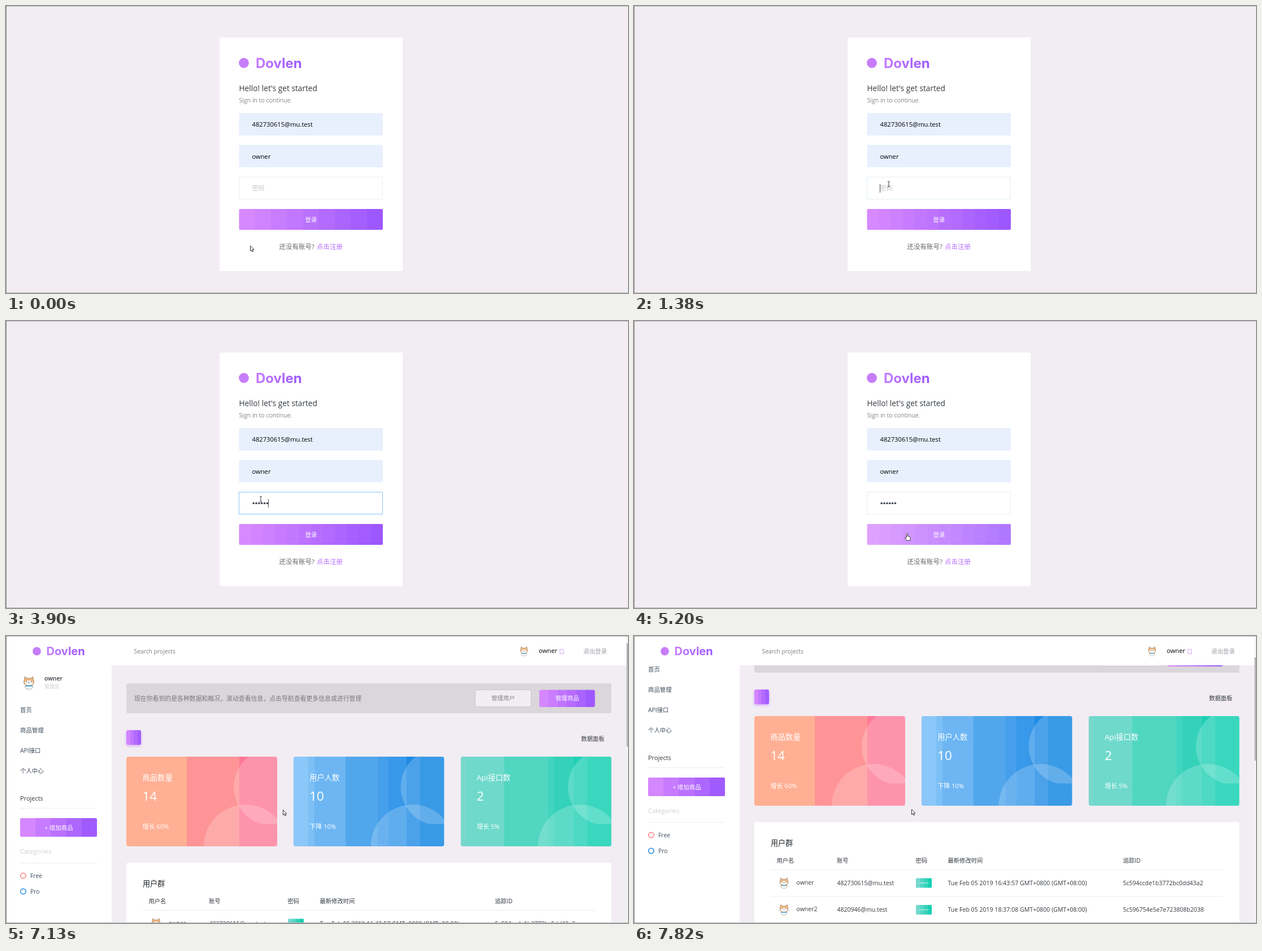
Write an HTML page with a canvas that moves like this. It is 1101 by 509 pixels and loops after 8 s.

```html
<!DOCTYPE html>
<html lang="zh-CN">
<head>
<meta charset="utf-8">
<title>Login and dashboard</title>
<style>
html, body { margin: 0; width: 100%; height: 100%; overflow: hidden; background: #f2edf3; }
canvas { display: block; }
</style>
</head>
<body>
<canvas id="stage" width="1101" height="509"></canvas>
<script>
const ctx = document.getElementById('stage').getContext('2d');
const LOOP = 8000;
const SANS = '"Open Sans", "Noto Sans CJK SC", "Noto Sans CJK JP", sans-serif';
const BRAND = 'Dovlen', USER = 'owner', MAIL = '482730615@mu.test';
const VIOLET = ['#da8cff', '#9a55ff'], TEAL = ['#84d9d2', '#07cdae'];

// Timelines: each entry holds from its time until the next one.
const CURSOR = [
  [0, 'arrow', 432, 425], [410, 'arrow', 432, 414], [570, 'hand', 436, 384],
  [700, 'hand', 443, 362], [830, 'beam', 452, 321], [980, 'beam', 451, 316],
  [4030, 'beam', 460, 326], [4180, 'arrow', 467, 346], [4310, 'hand', 473, 361],
  [4460, 'hand', 479, 376], [6550, 'arrow', 481, 375], [6700, 'arrow', 482, 361],
  [6850, 'arrow', 487, 332], [6970, 'arrow', 490, 310], [7130, 'arrow', 490, 308],
  [7290, 'arrow', 491, 307]
];
const DOTS = [[0, 0], [1960, 1], [2270, 2], [2680, 3], [3110, 4], [3500, 5], [3900, 6]];
const CARET = [[0, 0], [1380, 1], [1820, 0], [1960, 1], [4310, 0]];
const BORDER = [[0, '#ebedf2'], [1380, '#e2eef6'], [1500, '#8cc4fa'], [4920, '#d5e7f7'], [5050, '#ebedf2']];
const BUTTON_ALPHA = [[0, 1], [570, .92], [700, .96], [830, 1], [4460, .96], [4920, .9], [5050, .8]];
const SCROLL = [[0, 0], [7690, 11.5], [7820, 72]];

const at = (list, t) => list.filter(entry => entry[0] <= t).pop();
const valueAt = (list, t) => at(list, t)[1];

function box(x, y, w, h, fill, radius = 0) {
  ctx.fillStyle = fill;
  ctx.beginPath();
  ctx.roundRect(x, y, w, h, radius);
  ctx.fill();
}

function disc(x, y, r, fill) {
  ctx.fillStyle = fill;
  ctx.beginPath();
  ctx.arc(x, y, r, 0, 7);
  ctx.fill();
}

// y is the middle of the capitals.
function text(str, x, y, size, fill, { align = 'left', weight = 400, family = SANS } = {}) {
  ctx.font = `${weight} ${size}px ${family}`;
  ctx.textAlign = align;
  ctx.fillStyle = fill;
  ctx.fillText(str, x, y + size * .37);
}

function mix(from, to, k) {
  const channel = (c, i) => parseInt(c.slice(1 + 2 * i, 3 + 2 * i), 16);
  return `rgb(${[0, 1, 2].map(i => Math.round(channel(from, i) * (1 - k) + channel(to, i) * k))})`;
}

// Horizontal gradient of flat bands; stops are [start, colour].
function banded(x, w, stops) {
  const g = ctx.createLinearGradient(x, 0, x + w, 0);
  stops.forEach(([start, colour], i) => {
    g.addColorStop(start, colour);
    g.addColorStop(i + 1 < stops.length ? stops[i + 1][0] : 1, colour);
  });
  return g;
}

const evenBands = (x, w, [from, to], n) =>
  banded(x, w, Array.from({ length: n }, (_, i) => [i / n, mix(from, to, (i + .5) / n)]));

function brand(iconX, textX, y, size) {
  disc(iconX, y, size * .37, '#c77dfa');
  const g = ctx.createLinearGradient(textX, 0, textX + size * 3.4, 0);
  g.addColorStop(0, '#c67cff');
  g.addColorStop(1, '#9a55ff');
  text(BRAND, textX, y, size, g, { weight: 700, family: 'Inter, sans-serif' });
}

// Simple dog portrait, 20 units wide.
function dog(x, y, scale) {
  ctx.save();
  ctx.translate(x, y);
  ctx.scale(scale, scale);
  ctx.strokeStyle = '#8d7260';
  ctx.lineWidth = .7;
  ctx.fillStyle = '#fff';
  ctx.beginPath();
  ctx.ellipse(0, 7, 7, 4.5, 0, 0, 7);
  ctx.fill();
  ctx.stroke();
  ctx.fillStyle = '#ebb57d';
  ctx.beginPath();
  ctx.moveTo(-9, -2);
  ctx.lineTo(-7, -11);
  ctx.lineTo(-3, -8);
  ctx.lineTo(3, -8);
  ctx.lineTo(7, -11);
  ctx.lineTo(9, -2);
  ctx.quadraticCurveTo(9, 5, 0, 5);
  ctx.quadraticCurveTo(-9, 5, -9, -2);
  ctx.fill();
  ctx.stroke();
  ctx.fillStyle = '#fff';
  ctx.beginPath();
  ctx.ellipse(0, 0, 7, 4.2, 0, 0, 7);
  ctx.fill();
  for (const [dx, dy] of [[-4, -2], [4, -2], [0, 0]]) disc(dx, dy, .9, '#5a463c');
  box(-6, 4.5, 12, 2.2, '#5cb0d0', 1);
  ctx.restore();
}

const SHAPES = {
  arrow: new Path2D('M.5 .5V9.5L2.6 7.6L4 11L5.6 10.3L4.1 7.1H7Z'),
  hand: new Path2D('M3.5 8V1.6Q4.5 0 5.5 1.6V5.5L9.4 6.6Q10.5 7 10.3 8.4L9.3 13.4H4.2L.8 9Q.4 7.6 1.8 7.5Z'),
  beam: new Path2D('M-2 -4.5H-.5L0 -4L.5 -4.5H2M0 -4V4M-2 4.5H-.5L0 4L.5 4.5H2')
};

function cursor(t) {
  const [, kind, x, y] = at(CURSOR, t);
  ctx.save();
  ctx.translate(x, y);
  ctx.strokeStyle = '#222';
  ctx.lineWidth = .9;
  if (kind !== 'beam') {
    ctx.fillStyle = '#fff';
    ctx.fill(SHAPES[kind]);
  }
  ctx.stroke(SHAPES[kind]);
  ctx.restore();
}

function login(t) {
  box(378, 56, 324, 414, '#fff');
  brand(421, 442, 101, 24);
  text("Hello! let's get started", 412.5, 146, 13.72, '#343a40');
  text('Sign in to continue.', 412.5, 166.5, 10.95, '#42474c', { weight: 300 });

  box(412.5, 190, 254.5, 39.5, '#e8f0fe');
  text(MAIL, 435.5, 210, 11.2, '#000');
  box(412.5, 246.5, 254.5, 39.5, '#e8f0fe');
  text(USER, 435.5, 266.5, 11.2, '#000');

  ctx.strokeStyle = valueAt(BORDER, t);
  ctx.lineWidth = 1;
  ctx.strokeRect(412.5, 303.5, 254, 39);
  const dots = valueAt(DOTS, t);
  if (!dots) text('密码', 435.5, 323, 11, '#c9c8c9');
  for (let i = 0; i < dots; i++) disc(438.2 + i * 4.85, 323.3, 1.8, '#3f4650');
  if (valueAt(CARET, t)) box(435 + Math.round(dots * 4.75), 316, 1, 15, '#495057');

  ctx.globalAlpha = valueAt(BUTTON_ALPHA, t);
  box(412.5, 360, 254.5, 37, evenBands(412.5, 254.5, VIOLET, t < 570 ? 9 : 12), 2);
  ctx.globalAlpha = 1;
  text('登录', 540, 379.5, 10.5, '#fff', { align: 'center' });
  text('还没有账号?', 483.5, 427, 11.5, '#666');
  text('点击注册', 550, 427, 11.5, '#b66dff');
}

function statCard(x, stops, title, count, trend) {
  ctx.save();
  ctx.beginPath();
  ctx.roundRect(x, 214, 267, 159, 4);
  ctx.clip();
  box(x, 214, 267, 159, banded(x, 267, stops));
  ctx.save();
  ctx.beginPath();
  ctx.rect(x, 214, 267, 119.5);
  ctx.clip();
  disc(x + 258, 268, 68, '#fff3');
  ctx.restore();
  disc(x + 211, 373, 74, '#fff3');
  ctx.restore();
  text(title, x + 28.5, 251.5, 13.3, '#fff');
  text(count, x + 28.5, 284, 22.5, '#fff');
  text(trend, x + 28.5, 338, 11.1, '#fff');
}

function sidebar() {
  box(1, 0, 186, 700, '#fff');
  dog(40.5, 83, 1);
  text(USER, 68, 75.5, 10.5, '#343a40', { weight: 600 });
  text('管理员', 68, 90, 8.8, '#cfcdd0');
  ['首页', '商品管理', 'API接口', '个人中心'].forEach((label, i) =>
    text(label, 25, 131 + i * 35.9, 10.4, '#3e4b5b'));
  text('Projects', 25, 287.5, 11, '#343a40');
  box(25, 305, 136, 1, '#ebedf2');
  box(25, 323, 136, 33, evenBands(25, 136, VIOLET, 5), 2);
  text('+ 增加商品', 93.5, 340, 10.5, '#fff', { align: 'center' });
  text('Categories', 25, 382, 11.2, '#d2cfd4');
  box(25, 402, 136, 1, '#ebedf2');
  [['Free', '#fe8f8f'], ['Pro', '#3c95e6']].forEach(([label, colour], i) => {
    const y = 425 + i * 28;
    ctx.strokeStyle = colour;
    ctx.lineWidth = 1.7;
    ctx.beginPath();
    ctx.arc(30.5, y, 4.7, 0, 7);
    ctx.stroke();
    text(label, 43, y, 10.4, '#3e4b5b');
  });
}

function tableRow(y, name, mail, date, id) {
  dog(265.5, y + 1, .82);
  text(name, 287.5, y, 10.5, '#343a40');
  text(mail, 359.5, y + 1, 10.5, '#343a40');
  box(499, y - 7.5, 28, 17, evenBands(499, 28, TEAL, 4), 1);
  for (let i = 0; i < 8; i++) disc(506 + i * 2.1, y + 1, .75, '#fff');
  text(date, 555.5, y + 1, 10.58, '#343a40');
  text(id, 865.5, y + 1, 10.5, '#343a40');
  box(242, y + 24.5, 801, 1, '#ebedf2');
}

function mainPanel() {
  box(213, 84, 858.5, 53, '#dbd6da', 3);
  text('现在你看到的是各种数据和概况，滚动查看信息，点击导航查看更多信息或进行管理', 227, 111, 10.88, '#7c777c');
  box(830, 95, 100, 31, '#cbc6cc', 3);
  box(831, 96, 98, 29, '#f2edf3', 2);
  text('管理用户', 880, 110.5, 10.4, '#858086', { align: 'center' });
  box(944, 95.5, 98.5, 30.5, evenBands(944, 98.5, VIOLET, 6), 3);
  text('管理商品', 993.5, 110.5, 10.4, '#fff', { align: 'center' });

  ctx.shadowColor = '#b66dff80';
  ctx.shadowBlur = 5;
  ctx.shadowOffsetY = 2;
  box(213, 167, 26, 26, evenBands(213, 26, VIOLET, 4), 3);
  ctx.shadowColor = 'transparent';
  text('数据面板', 1018, 182, 10.3, '#343a40');

  statCard(213, [[0, '#ffb094'], [.4, '#fe9496'], [.75, '#fe7996']], '商品数量', '14', '增长 60%');
  statCard(508.7, [[0, '#8bc7f9'], [.1, '#7dc0f6'], [.14, '#6db6f3'], [.345, '#52a7ec'],
    [.56, '#459feb'], [.63, '#3898e9'], [.75, '#1f8be4'], [.84, '#0781e0']], '用户人数', '10', '下降 10%');
  statCard(804.7, [[0, '#79d8cc'], [.03, '#6fd9cc'], [.29, '#51d6c2'], [.58, '#42d4be'],
    [.62, '#35d2ba'], [.75, '#20cfb5'], [.84, '#09cdaf']], 'Api接口数', '2', '增长 5%');

  box(213, 402, 858.5, 400, '#fff', 4);
  text('用户群', 242, 439, 13.1, '#212529', { weight: 500 });
  [['用户名', 252.5], ['账号', 359], ['密码', 498.5], ['最新修改时间', 555.5], ['追踪ID', 865.5]]
    .forEach(([label, x]) => text(label, x, 470.5, 10.3, '#343a40'));
  box(242, 486, 801, 1, '#ebedf2');
  tableRow(509, USER, MAIL, 'Tue Feb 05 2019 16:43:57 GMT+0800 (GMT+08:00)', '5c594ccde1b3772bc0dd43a2');
  tableRow(556.5, USER + '2', '4820946@mu.test', 'Tue Feb 05 2019 18:37:08 GMT+0800 (GMT+08:00)', '5c596754e5e7e723808b2038');
}

function topBar() {
  box(1, 1, 1097, 51, '#fff');
  brand(54.5, 71.5, 27, 20);
  text('Search projects', 226.5, 27, 10.3, '#7d7d82');
  dog(917, 27, .72);
  text(USER, 943, 25.5, 11.1, '#000');
  ctx.strokeStyle = '#d9a9ff';
  ctx.lineWidth = 1;
  ctx.strokeRect(980.5, 23.5, 6, 8);
  text('退出登录', 1022, 27, 10.4, '#9c9fa6');
}

function dashboard(t) {
  const scroll = valueAt(SCROLL, t);
  ctx.save();
  ctx.translate(0, -scroll);
  sidebar();
  mainPanel();
  ctx.restore();
  topBar();
  box(1098, 1, 3, 507, '#f4f2f5');
  box(1098.5, 13 + scroll * .347, 2.5, 183, '#b4b2b5');
}

function frame(now) {
  const t = now % LOOP;
  box(0, 0, 1101, 509, '#f2edf3');
  (t < 5650 ? login : dashboard)(t);
  box(0, 0, 1101, 1, '#b8b5b9');
  box(0, 508, 1101, 1, '#b8b5b9');
  box(0, 0, 1, 509, '#8c8a8d');
  cursor(t);
}

const start = performance.now();
function tick() {
  frame(performance.now() - start);
  requestAnimationFrame(tick);
}
tick();
</script>
</body>
</html>
```
